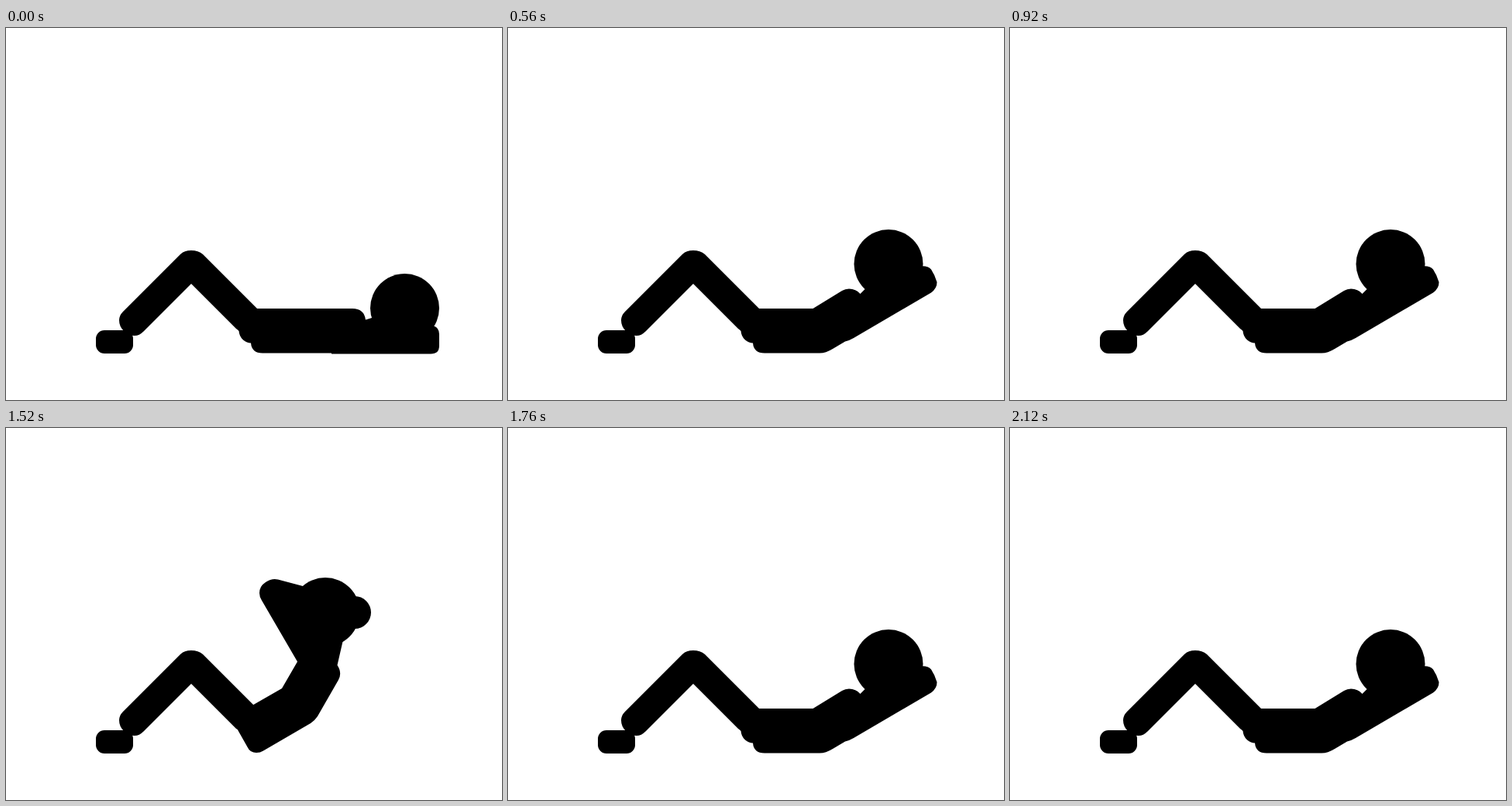
An HTML page for the animation above (2.36 s loop, 640 by 480 pixels).

```html
<!DOCTYPE html>
<html lang="en">
<head>
<meta charset="utf-8">
<title>Sit-ups</title>
<style>
  html, body { margin: 0; width: 100%; height: 100%; overflow: hidden; background: #fff; }
  svg { display: block; width: 100vw; height: 100vh; }
</style>
</head>
<body>
<svg viewBox="0 0 640 480">
  <rect x="116" y="390" width="48" height="30" rx="11"/>
  <path d="M239 330 L177.5 391.5 Q172 397 166 397 Q158 397 152 391 Q146 385 146 377 Q146 371 151 366
    L225 292 Q230 287 239 287 Q248 287 254 292 L326 364 L320 400 L297 388 Z"/>
  <path id="body"/>
  <circle id="head" r="44.5"/>
</svg>
<script>
const hip = 'M297 387.5 L300.5 391 Q301 398 306 402.5 Q311 406.5 316 406.5 Q317 419.5 331 419.5 ';
const poses = {
  flat: {
    head: [514.5, 361.5],
    body: hip + `L420 419.5 V420.5 H548 Q559 420.5 559 410 V395 Q559 387 552 384.5
      L500 370 L472 374 L464 376.5 Q462 362 447 362 H324 Z`
  },
  raised: {
    head: [491, 304.5],
    body: hip + `L402 419.5 Q410 419.5 419 414 L435 404.5 Q440 403.5 446 400 L546 341.5
      Q553.5 336 553.5 328 Q551 319 546 311.5 Q541 306.5 533 307.5 L480 320 L460 337.5
      L454.5 343 Q449 336.5 440 336.5 Q435 336.5 431 339 L393.5 362 H324 Z`
  },
  up: {
    head: [412, 237.5],
    body: `M297 386 L312 412.5 Q315 419 323 419 Q328 419 332 416.5 L393 381 Q398 378 402 372
      L429 325 Q434 316 427.5 306 L434.5 275.5 L450 259 A20.7 20.7 0 1 0 450 217
      L420 210 L383 204 L351 195.5 Q343 193.5 335 199 Q327 204 327 213 Q327 218 330 222.5
      L376 301.5 L356 336 L318.5 357.5 Z`
  }
};

// [end of step in ms, pose]
const steps = [[560, 'flat'], [1160, 'raised'], [1760, 'up'], [2360, 'raised']];
const loop = 2360;
const body = document.getElementById('body');
const head = document.getElementById('head');
let shown;

function show(name) {
  if (name === shown) return;
  shown = name;
  const pose = poses[name];
  body.setAttribute('d', pose.body);
  head.setAttribute('cx', pose.head[0]);
  head.setAttribute('cy', pose.head[1]);
}

const start = performance.now();
function tick() {
  const t = (performance.now() - start) % loop;
  show(steps.find(([end]) => t < end)[1]);
  requestAnimationFrame(tick);
}
tick();
</script>
</body>
</html>
```
